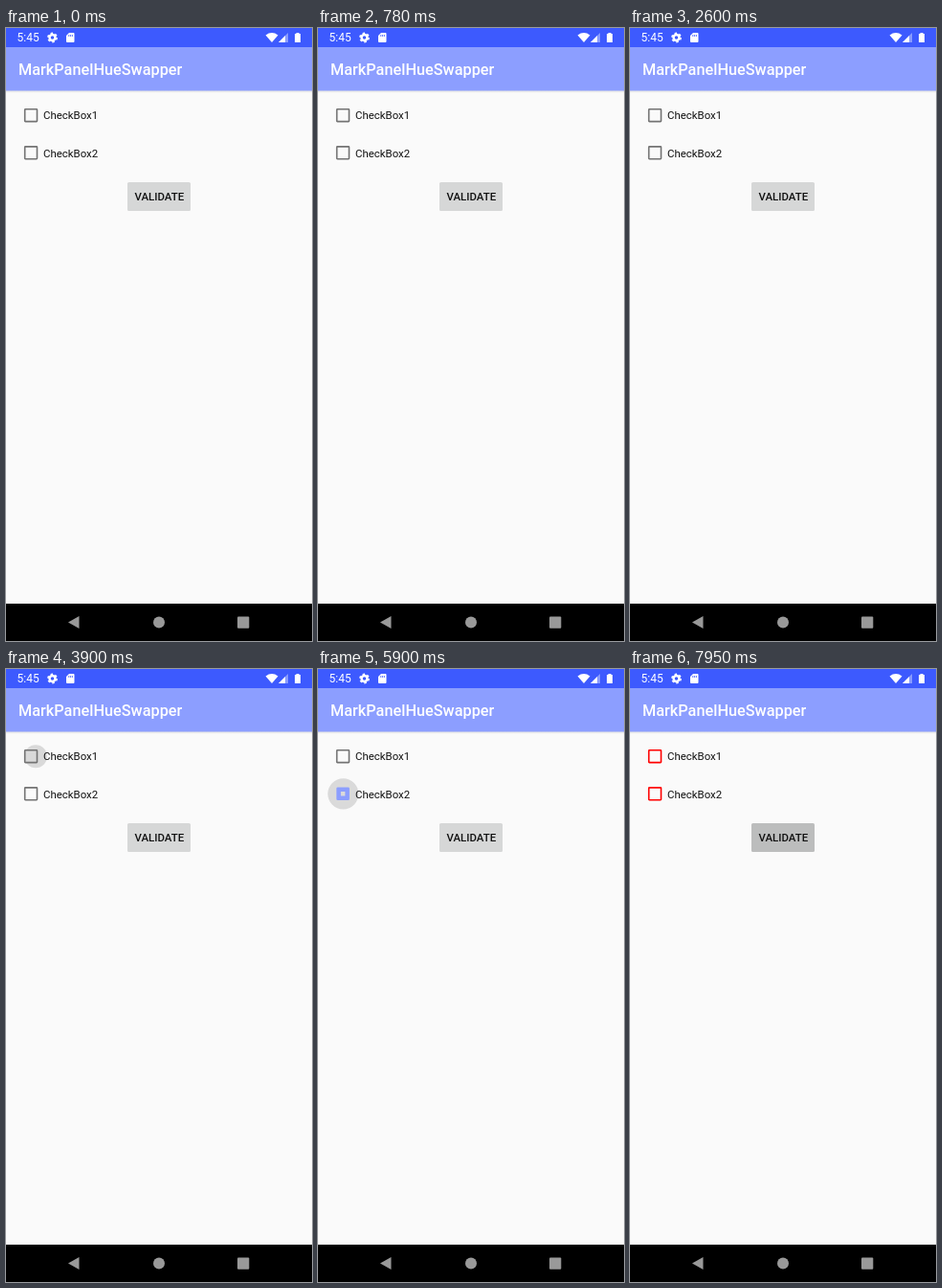
Recreate the animation shown at these times as an HTML page. Size 320 by 640 pixels, loop 8000 ms.

```html
<!DOCTYPE html>
<html lang="en">
<head>
<meta charset="utf-8">
<title>Checkbox demo</title>
<style>
  html, body { margin: 0; width: 100%; height: 100%; overflow: hidden; background: #fafafa; }
  svg { display: block; width: 100vw; height: 100vh; font-family: Roboto, "Noto Sans", sans-serif; }
</style>
</head>
<body>
<svg viewBox="0 0 320 640">
  <defs>
    <clipPath id="face"><rect x="127" y="161" width="66" height="30" rx="1.6"/></clipPath>
    <linearGradient id="shade" x2="0" y2="1">
      <stop stop-color="#dedede"/><stop offset="1" stop-color="#fafafa"/>
    </linearGradient>
  </defs>
  <rect width="320" height="640" fill="#fafafa"/>
  <rect y="65" width="320" height="3" fill="url(#shade)"/>
  <rect width="320" height="65.5" fill="#8c9eff"/>
  <rect width="320" height="20" fill="#3d5afe"/>

  <!-- status bar -->
  <g fill="#fff">
    <text x="11.5" y="14.2" font-size="12">5:45</text>
    <circle cx="48.5" cy="10" r="3" fill="none" stroke="#fff" stroke-width="2.4"/>
    <circle cx="48.5" cy="10" r="4.6" fill="none" stroke="#fff" stroke-width="1.6" stroke-dasharray="2.4 2.417"/>
    <path d="M66 5h4.5q1 0 1 1v8q0 1-1 1h-6.5q-1 0-1-1v-6z"/>
    <path d="M65.8 7v2M67.6 7v2M69.4 7v2" stroke="#3d5afe" stroke-width=".8"/>
    <path d="M271.5 7.500q6.500-4.800 13 0l-6.500 7.500z"/>
    <path d="M295 5v10h-10z" opacity=".4"/>
    <path d="M292 8v7h-7z"/>
    <path d="M303.5 5h3v1h1.500v9h-6v-9h1.500z"/>
  </g>
  <text x="13" y="49" font-size="16.3" font-weight="500" fill="#fff">MarkPanelHueSwapper</text>

  <g id="boxes"></g>

  <!-- button -->
  <rect x="127" y="161" width="66" height="30" rx="1.6" fill="#d6d7d7"/>
  <circle id="press" cx="160" cy="176" clip-path="url(#face)"/>
  <text x="160.3" y="180.3" font-size="11.43" font-weight="500" text-anchor="middle" fill="#111">VALIDATE</text>

  <!-- navigation bar -->
  <rect y="601" width="320" height="39"/>
  <g fill="#999">
    <path d="M65 620.5l11.5-6.500v13z"/>
    <circle cx="160" cy="620.5" r="6"/>
    <rect x="242" y="614.5" width="12.3" height="12.3" rx="1"/>
  </g>
</svg>
<script>
const LOOP = 8000, PRESS_AT = 7700, RED_AT = 7810, HOLD = 105;
const GREY = '#737373', BLUE = '#8c9eff', RED = '#f00';
const X = 26.1, SIZE = 14.4, HOLE = 11.2;

// Two taps per checkbox: the first ticks it, the second clears it.
const boxes = [
  { y: 91.2, label: 'CheckBox1', taps: [3815, 4690] },
  { y: 130.3, label: 'CheckBox2', taps: [5705, 6560] }
];

const clamp = x => Math.max(0, Math.min(1, x));
const span = (t, from, length) => clamp((t - from) / length);
const easeOut = x => 1 - (1 - x) ** 2;
const smooth = x => x * x * (3 - 2 * x);
const set = (el, attrs) => { for (const k in attrs) el.setAttribute(k, attrs[k]); };

function add(parent, tag, attrs) {
  const el = document.createElementNS('http://www.w3.org/2000/svg', tag);
  set(el, attrs);
  return parent.appendChild(el);
}

// Rounded square with a square hole.
function frame(size, hole) {
  const r = 1.4, s = size - 2 * r, h = hole / 2;
  return `M${-s / 2} ${-size / 2}h${s}q${r} 0 ${r} ${r}v${s}q0 ${r} ${-r} ${r}` +
    `h${-s}q${-r} 0 ${-r} ${-r}v${-s}q0 ${-r} ${r} ${-r}z` +
    `M${-h} ${-h}h${hole}v${hole}h${-hole}z`;
}

for (const b of boxes) {
  const root = add(document.getElementById('boxes'), 'g', { transform: `translate(${X} ${b.y})` });
  b.ripple = add(root, 'circle', {});
  b.mark = add(root, 'g', {});
  b.frame = add(b.mark, 'path', { 'fill-rule': 'evenodd' });
  b.tick = add(b.mark, 'path', { d: 'M-5.1-.4L-1.6 3L5.1-3.8', fill: 'none', stroke: '#fafafa', 'stroke-width': 1.7 });
  add(root, 'text', { x: 12.9, y: 4.2, 'font-size': 11.43, fill: '#111' }).textContent = b.label;
}

function drawBox(b, t) {
  const [on, off] = b.taps.map(d => d + HOLD);
  const checked = t >= on && t < off;
  const start = t < off ? on : off;
  const close = smooth(span(t, start, 166));
  const open = smooth(span(t, start + 166, 333));
  let hole = 1, tick = 0;
  if (checked) {
    hole = 1 - close;
    tick = open;
  } else if (t >= off) {
    hole = open;
    tick = 1 - close;
  }
  set(b.mark, { transform: `scale(${1 - 0.1 * (close - open)})` });
  set(b.frame, { d: frame(SIZE, HOLE * hole), fill: checked ? BLUE : t >= RED_AT ? RED : GREY });
  set(b.tick, { transform: `scale(${tick})`, opacity: tick > 0 ? 1 : 0 });

  const down = t < b.taps[1] ? b.taps[0] : b.taps[1];
  const grow = easeOut(span(t, down, 225));
  const alpha = 0.13 * span(t, down, 75) * (1 - span(t, down + 225, 150));
  set(b.ripple, { cx: 13 * (1 - grow), r: 16.3 * (0.3 + 0.7 * grow), opacity: alpha });
}

const press = document.getElementById('press');
function draw(now) {
  const t = now % LOOP;
  for (const b of boxes) drawBox(b, t);
  set(press, {
    r: 10 + 28 * easeOut(span(t, PRESS_AT, 225)),
    opacity: 0.12 * span(t, PRESS_AT, 75)
  });
  requestAnimationFrame(draw);
}
draw(0);
</script>
</body>
</html>
```
